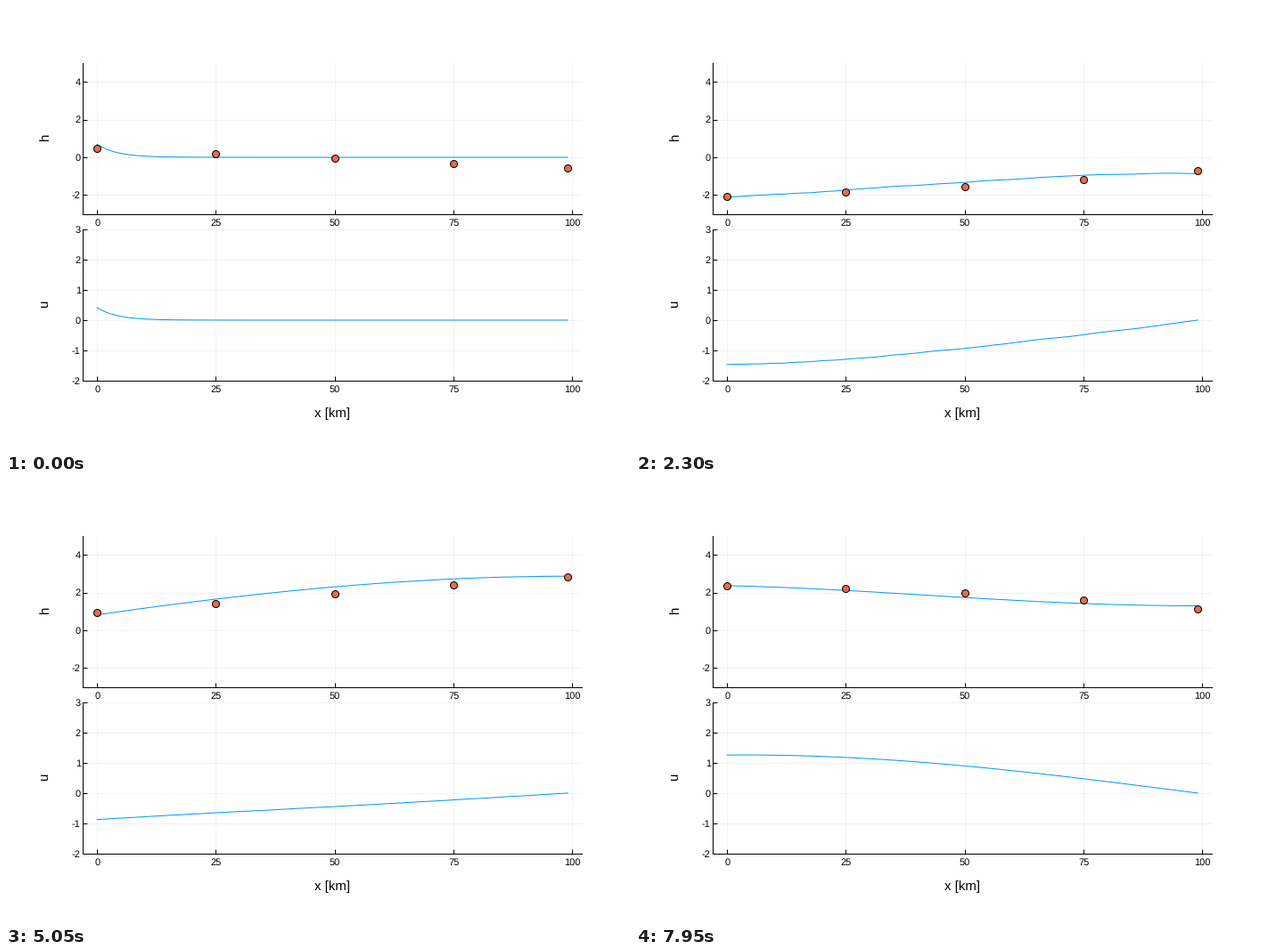
A matplotlib script that plays this animation: 700x500 px, repeating every 8 s.

```python
import numpy as np
import matplotlib.pyplot as plt
from matplotlib.animation import FuncAnimation

W, H, DPI = 700, 500, 100
FRAMES, INTERVAL = 160, 50
PX = 72 / DPI  # points per pixel
BLUE, ORANGE = "#009AFA", "#E26F46"

plt.rcParams["font.family"] = "Liberation Sans"
plt.rcParams["axes.unicode_minus"] = False
plt.rcParams["text.hinting"] = "none"

PERIOD = 73.6  # semidiurnal tide in ten-minute steps
STATIONS = np.array([0, 25, 50, 75, 99])


def tide(s, t):
    """Water level at gauge s (0 at the sea, 4 at the closed end)."""
    def wave(order, amp, lag):
        return amp * np.cos(2 * np.pi * order * t / PERIOD - np.radians(lag))

    springs = 1 + 0.0003 * t
    return (0.05 + 0.0375 * s
            + wave(0.5, 0.09, 278)
            + wave(1, 2.0 + 0.085 * s, 69 + 11.25 * s) * springs
            + wave(2, 0.137 + 0.012 * s, 158 + 25 * s)
            + wave(3, 0.24 - 0.12 * s, 136 + 5 * s))


def simulate(left, n=100, length=100e3, g=9.81, depth=20.0, dt=600.0, theta=0.505):
    """Linear shallow water channel: h and u alternate in the state vector."""
    friction = 1 / (0.06 * 86400)
    dx = length / (n + 0.5)
    L = np.zeros((2 * n, 2 * n))
    for i in range(1, 2 * n - 1):
        c = (g if i % 2 else depth) / dx
        L[i, i - 1:i + 2] = -c, friction * (i % 2), c
    ahead = np.linalg.inv(np.eye(2 * n) + theta * dt * L)
    back = np.eye(2 * n) - (1 - theta) * dt * L
    state, out = np.zeros(2 * n), []
    for h0 in left:
        rhs = back @ state
        rhs[0] = h0
        state = ahead @ rhs
        out.append(state)
    return np.array(out)


steps = np.arange(FRAMES)
gauges = np.array([tide(s, steps) for s in range(len(STATIONS))])
states = simulate(tide(0, steps + 1))
x = np.arange(100)

fig = plt.figure(figsize=(W / DPI, H / DPI), dpi=DPI, facecolor="white")


def label(px, py, text, angle=0):
    fig.text(px / W, 1 - py / H, text, size=15 * PX, rotation=angle,
             ha="center", va="center")


def panel(top, bottom, ylim, yticks, name):
    ax = fig.add_axes([86.3 / W, 1 - bottom / H, 559.7 / W, (bottom - top) / H])
    ax.set(xlim=(-2.97, 101.97), ylim=ylim, xticks=range(0, 101, 25), yticks=yticks)
    ax.spines[["top", "right"]].set_visible(False)
    ax.spines[["left", "bottom"]].set_linewidth(PX)
    ax.set_axisbelow(True)
    ax.grid(color="black", alpha=0.05, linewidth=PX)
    ax.tick_params(direction="in", length=5 * PX, width=PX, labelsize=11 * PX)
    ax.tick_params(axis="x", pad=5 * PX)
    ax.tick_params(axis="y", pad=2.5 * PX)
    label(44, (top + bottom) / 2 - 1.5, name, 90)
    return ax


ax_h = panel(63.8, 233.7, (-3, 5), range(-2, 5, 2), "h")
ax_u = panel(251.3, 420.7, (-2, 3), range(-2, 4), "u")
label(366.5, 458.5, "x [km]")

line_h, = ax_h.plot([], [], color=BLUE, linewidth=PX)
line_u, = ax_u.plot([], [], color=BLUE, linewidth=PX)
dots, = ax_h.plot([], [], "o", color=ORANGE, markersize=8 * PX, snap=False,
                  markeredgecolor="black", markeredgewidth=PX, clip_on=False)


def draw(k):
    line_h.set_data(x, states[k, 0::2])
    line_u.set_data(x, states[k, 1::2])
    dots.set_data(STATIONS, gauges[:, k])
    return line_h, line_u, dots


anim = FuncAnimation(fig, draw, frames=FRAMES, interval=INTERVAL,
                     init_func=lambda: draw(0), repeat=True, repeat_delay=0)
plt.show()
```
